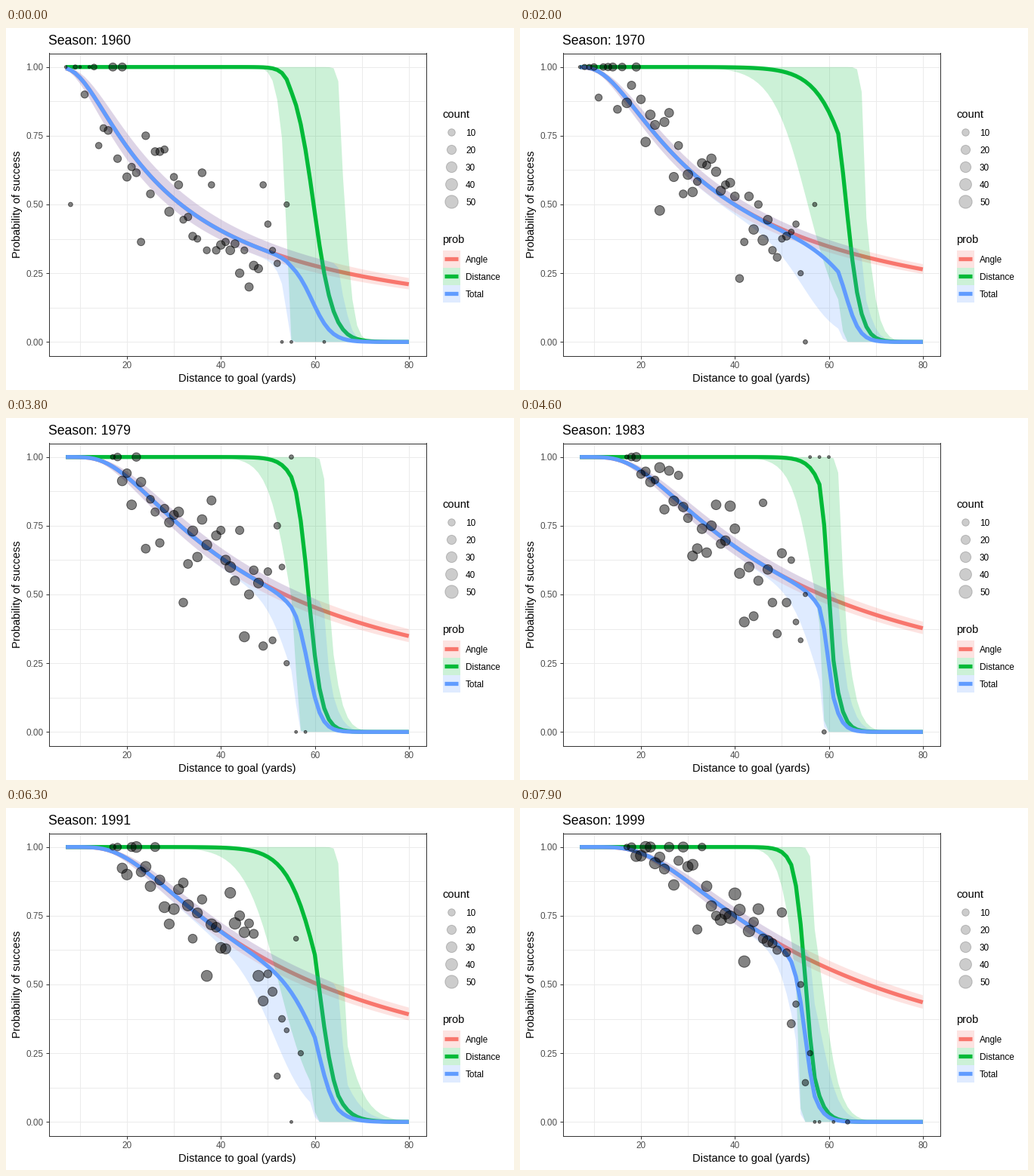
Recreate the animation shown at these times as a matplotlib script. Size 672 by 480 pixels, loop 8000 ms.

```python
import math
import numpy as np
import matplotlib.pyplot as plt
from matplotlib.animation import FuncAnimation
from matplotlib.patches import Rectangle

W, H, DPI = 672, 480, 96
PX = 72 / DPI                      # points per pixel
FRAMES, STEP = 80, 100
RATE = 49 / 99                     # seasons per frame
FIRST, LAST, NEW_POSTS = 1960, 1999, 1974
YARDS = np.arange(7, 81)
HALF_GOAL = 3.083
COLORS = {"Angle": "#F8766D", "Distance": "#00BA38", "Total": "#619CFF"}

# Angle error and spread, then log-odds shapes of the distance curve:
# mid (yard, value, yard, value, slope before, slope after),
# low (yard, value, slope before), high (yard, value, slope after)
KEYS = {
    1960: (.1447, .100, 55, 2.31, 66, -3.05, .75, .50, 53, 1.05, .95, 66, .4, 1.05),
    1965: (.1223, .075, 53, 2.50, 56, .66, .29, .40, 53, -.16, .32, 65.6, -.5, .57),
    1970: (.1142, .070, 62, 1.14, 68, -2.84, .25, .68, 62, -1.7, .262, 68, -.2, .75),
    1975: (.0921, .080, 55, 2.59, 64, -2.75, .45, .63, 55, 0, .40, 65.4, -.55, .64),
    1983: (.0783, .065, 58, 2.20, 61, -1.05, .50, .74, 57.6, -.2, .41, 63.2, -.2, .66),
    1991: (.0752, .065, 60, .44, 65, -2.25, .285, .43, 59, -1.75, .265, 66.4, -.75, .36),
    1999: (.0669, .063, 52, 2.67, 57, -1.66, .65, .60, 52.5, .4, .55, 57, .85, .53),
}
YARD_SLOTS = [2, 4, 8, 11]         # entries of a key that are distances

erf = np.vectorize(math.erf)


def angle_prob(sigma):
    return erf(np.arctan(HALF_GOAL / YARDS) / sigma / math.sqrt(2))


def logistic(v):
    return 1 / (1 + np.exp(-np.clip(v, -30, 30)))


def bands(shape):
    """Low, middle and high curves for each probability."""
    sigma, spread, d1, v1, d2, v2, a, b, dl, vl, al, dh, vh, bh = shape
    before = lambda d: np.maximum(d - YARDS, 0)
    after = lambda d: np.maximum(YARDS - d, 0)
    mid = np.interp(YARDS, [d1, d2], [v1, v2]) + a * before(d1) - b * after(d2)
    low = vl + al * before(dl) - 1.5 * after(dl) ** 2
    high = vh + 2.5 * before(dh) - bh * after(dh)
    dist = logistic(np.array([np.minimum(low, mid), mid, np.maximum(high, mid)]))
    ang = np.array([angle_prob(sigma * k) for k in (1 + spread, 1, 1 - spread)])
    return np.array([ang, dist, ang * dist])


def radius(n):
    """Marker radius in pixels for a count."""
    return 1.89 + 7.11 * np.sqrt((n - 1) / 54)


def area(r):
    return (2 * r * PX) ** 2


def kicks(year, chance, rng):
    """One dot per distance: yards, success rate, radius."""
    start, ramp = (7, 12) if year < NEW_POSTS else (17, 3)
    peak = 13 + 0.42 * (year - FIRST)
    mean = peak * np.clip((YARDS - start + 0.5) / ramp, 0, 1)
    mean = mean * logistic((51.5 - YARDS) / 1.6)
    tries = rng.poisson(mean + 0.12 * ((YARDS > 56) & (YARDS < 65)))
    tries = np.where((YARDS >= start) & (YARDS < 56), np.clip(tries, 1, 55), tries)
    made = rng.binomial(tries, np.clip(chance, 0, 1))
    on = tries > 0
    return np.c_[YARDS[on], made[on] / tries[on], radius(tries[on])]


def season(year):
    rng = np.random.default_rng(year)
    years = list(KEYS)
    table = np.array(list(KEYS.values()))
    shape = np.array([np.interp(year, years, col) for col in table.T])
    if year not in KEYS:
        shape[YARD_SLOTS] += rng.uniform(-1.2, 1.2)
    curves = bands(shape)
    return curves, kicks(year, curves[2, 1], rng)


SEASONS = [season(y) for y in range(FIRST, LAST + 1)]
STOPS = [int(i / RATE + 0.5) for i in range(len(SEASONS))]

plt.rcParams["font.family"] = "Liberation Sans"
fig = plt.figure(figsize=(W / DPI, H / DPI), dpi=DPI, facecolor="white")

# Page layer in pixels: titles and legends
page = fig.add_axes([0, 0, 1, 1])
page.set(xlim=(0, W), ylim=(H, 0))
page.axis("off")


def label(x, y, s, size, **kw):
    return page.text(x, y, s, size=size, **kw)


title = label(56.5, 21.8, "", 13.2)
label(306, 469.5, "Distance to goal (yards)", 11, ha="center")
label(14.8, 234, "Probability of success", 11, rotation=90, ha="center", va="center")

label(577, 119, "count", 11)
for i in range(5):
    n, y = 10 * (i + 1), 138 + 23 * i
    page.scatter([589], [y], s=area(radius(n)), facecolor=(0, 0, 0, 0.2),
                 edgecolor=(0, 0, 0, 0.2), linewidth=PX)
    label(608, y + 5, str(n), 8.8)

label(577, 285, "prob", 11)
for i, (name, color) in enumerate(COLORS.items()):
    y = 306 + 23 * i
    page.add_patch(Rectangle((577.5, y - 11.5), 23, 23, fc=color, alpha=0.2, lw=0))
    page.plot([580, 598], [y, y], color=color, lw=5.3 * PX, solid_capstyle="butt")
    label(608, y + 5, name, 8.8)

# Plot panel
ax = fig.add_axes([56.5 / W, 1 - 434.5 / H, 499 / W, 401 / H])
ax.set(xlim=(3.35, 83.65), ylim=(-0.05, 1.05))
ax.set_xticks(range(20, 81, 20))
ax.set_xticks(range(10, 71, 20), minor=True)
ax.set_yticks(np.arange(0, 1.01, 0.25))
ax.set_yticks(np.arange(0.125, 1, 0.25), minor=True)
ax.yaxis.set_major_formatter("{x:.2f}")
ax.set_axisbelow(True)
ax.grid(True, which="both", color="#EBEBEB", lw=PX)
ax.tick_params(length=2.75, width=PX, color="#333333", labelcolor="#4D4D4D",
               labelsize=8.8, pad=2.6)
ax.tick_params(which="minor", length=0)
for spine in ax.spines.values():
    spine.set(color="#333333", linewidth=PX, zorder=20)

ribbons, lines = [], []
for i, color in enumerate(COLORS.values()):
    ribbons += ax.fill([0, 1, 1], [0, 0, 1], fc=color, alpha=0.2, lw=0, zorder=3 + 2 * i)
    lines += ax.plot([], [], color=color, lw=5.3 * PX, solid_capstyle="butt",
                     zorder=4 + 2 * i)
points = ax.scatter([], [], facecolor=(0, 0, 0, 0.488), edgecolor=(0, 0, 0, 0.55),
                    linewidth=PX, zorder=10)


def state(frame):
    i = int(np.searchsorted(STOPS, frame, side="right")) - 1
    curves, dots = SEASONS[i]
    if frame == STOPS[i]:
        return curves, dots
    u = (frame - STOPS[i]) / (STOPS[i + 1] - STOPS[i])
    curves2, dots2 = SEASONS[i + 1]
    n = min(len(dots), len(dots2))
    return (curves * (1 - u) + curves2 * u,
            dots[:n] * (1 - u) + dots2[:n] * u)


def draw(frame):
    curves, dots = state(frame)
    title.set_text(f"Season: {round(FIRST + frame * RATE)}")
    for ribbon, line, (low, mid, high) in zip(ribbons, lines, curves):
        ribbon.set_xy(np.r_[np.c_[YARDS, high], np.c_[YARDS, low][::-1]])
        line.set_data(YARDS, mid)
    points.set_offsets(dots[:, :2])
    points.set_sizes(area(dots[:, 2]))
    return [title, points, *ribbons, *lines]


anim = FuncAnimation(fig, draw, frames=FRAMES, interval=STEP, repeat=True,
                     repeat_delay=0, blit=False)
plt.show()
```
